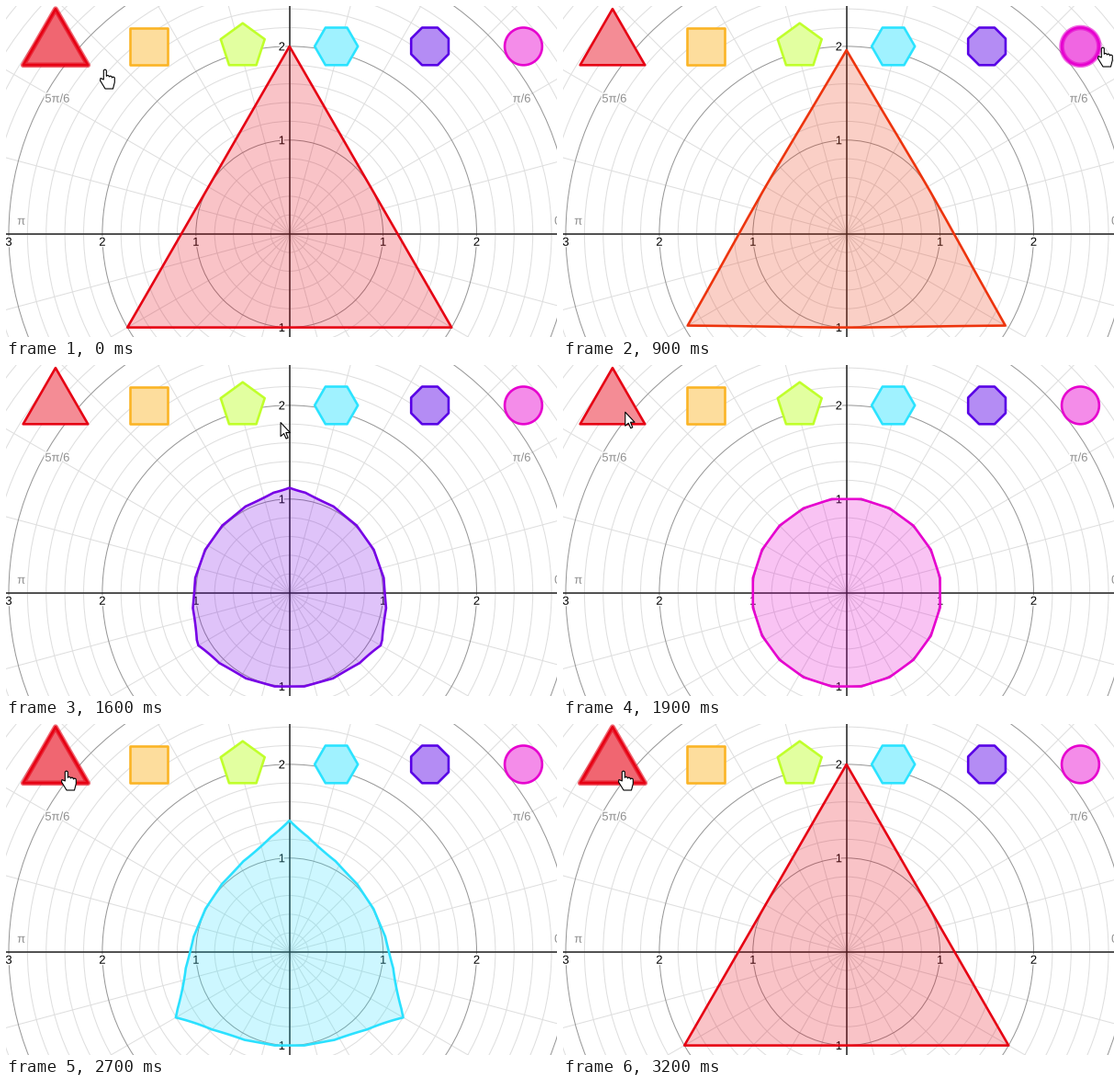
Animation, 600 px wide and 360 px high, one loop 3.3 s. Source, as a matplotlib script:

```python
from colorsys import hsv_to_rgb

import numpy as np
import matplotlib.pyplot as plt
from matplotlib.animation import FuncAnimation
from matplotlib.patches import Circle, Polygon
from matplotlib.patheffects import withStroke

W, H, DPI = 600, 360, 100
FRAMES, STEP = 33, 100
CX, CY, UNIT = 308.7, 247.7, 101.9
PX = 72 / DPI
THETA = np.radians(np.arange(360))

# Number of sides and hue of each button
ICONS = [(3, -5), (4, 40), (5, 78), (6, 188), (8, 263), (60, 306)]

# Pointer stops: time in ms, x, y
STOPS = [(0, 107, 69), (600, 587, 45), (900, 587, 45),
         (1230, 577, 43), (1930, 65, 51), (3300, 65, 51)]


def vivid(hue):
    """Deep reds and violets, softer and brighter greens between them."""
    k = np.clip(1.6 * np.sin(np.pi * (hue + 5) / 250), 0, 1)
    return np.array(hsv_to_rgb(hue / 360 % 1, 1 - .17 * k, .9 + .1 * k))


def tint(rgb, amount):
    return 1 - amount * (1 - rgb)


def smooth(x):
    return x * x * (3 - 2 * x)


def radius(n):
    """Polar radius of a flat-bottomed n-gon with inradius 1."""
    half = np.pi / n
    return 1 / np.cos((THETA + np.pi / 2 + half) % (2 * half) - half)


def polar(r, angle, cx=CX, cy=CY):
    return np.column_stack([cx + r * np.cos(angle), cy - r * np.sin(angle)])


def corners(n, cx, cy, inradius):
    angle = -np.pi / 2 + np.pi / n * (2 * np.arange(n) + 1)
    return polar(inradius / np.cos(np.pi / n), angle, cx, cy)


def hand_points():
    points = []
    for k, top in enumerate((0, 6.3, 7, 8)):
        x = 3 * k + .8
        points += [(x - 1.5, top + 1), (x, top), (x + 1.5, top + 1)]
    palm = [(11.3, 14), (9.5, 21), (1, 21), (-4.5, 12), (-4, 9.5), (-.7, 11)]
    return np.array(points + palm)


HAND = hand_points()
ARROW = np.array([(0, 0), (0, 15), (3.5, 12), (6, 17.5), (8, 16.6),
                  (5.8, 11), (10.3, 11)])

fig = plt.figure(figsize=(W / DPI, H / DPI), dpi=DPI, facecolor="white")
ax = fig.add_axes([0, 0, 1, 1])
ax.set_xlim(0, W)
ax.set_ylim(H, 0)
ax.axis("off")


def add_polygon(points, z, width=2.6):
    return ax.add_patch(Polygon(points, closed=True, lw=width * PX,
                                joinstyle="round", zorder=z))


def label(x, y, text, color="black", ha="center"):
    ax.text(x, y, text, family="Liberation Sans", size=13 * PX, color=color,
            ha=ha, va="center_baseline", zorder=3,
            path_effects=[withStroke(linewidth=3 * PX, foreground="white")])


def draw_grid():
    for k in range(1, 21):
        major = k % 5 == 0
        ax.add_patch(Circle((CX, CY), k * UNIT / 5, fill=False, lw=PX,
                            ec="#969696" if major else "#dedede",
                            zorder=1.5 if major else 1))
    for a in np.arange(0, np.pi, np.pi / 12):
        ax.plot(*polar(np.array([-450, 450]), a).T,
                color="#dedede", lw=PX, zorder=1)
    ax.plot([0, W], [CY, CY], color="#202020", lw=1.5 * PX, zorder=2)
    ax.plot([CX, CX], [0, H], color="#202020", lw=1.5 * PX, zorder=2)


def draw_labels():
    for k in (-3, -2, -1, 1, 2):
        label(CX + k * UNIT, CY + 8.5, str(abs(k)))
    for k in (2, 1, -1):
        label(304, CY - k * UNIT, str(abs(k)), ha="right")
    for degrees, text in ((0, "0"), (30, "π/6"), (150, "5π/6"), (180, "π")):
        x, y = polar(292, np.radians([degrees]))[0]
        lift = 14.5 if degrees % 180 == 0 else 1.5
        label(x, y - lift, text, "#909090")


draw_grid()
draw_labels()

R_TRI, R_ROUND = radius(3), radius(20)
shape = add_polygon(polar(UNIT * R_TRI, THETA), 4)

colors = [vivid(hue) for _, hue in ICONS]
centers = np.array([(CX + (k - 2.5) * UNIT, CY - 2 * UNIT)
                    for k in range(len(ICONS))])
icons, glows = [], []
for (n, _), (x, y), rgb in zip(ICONS, centers, colors):
    points = corners(n, x, y, UNIT / 5)
    icon, glow = add_polygon(points, 5), add_polygon(points, 6, 5.6)
    icon.set_edgecolor(rgb)
    glow.set(facecolor="none", edgecolor=(*rgb, .6))
    icons.append(icon)
    glows.append(glow)

pointer = add_polygon(ARROW, 9, 1.1)
pointer.set(facecolor="white", edgecolor="black")


def pointer_at(t):
    t %= FRAMES * STEP
    for (t0, x0, y0), (t1, x1, y1) in zip(STOPS, STOPS[1:]):
        if t < t1:
            break
    u = smooth((t - t0) / (t1 - t0))
    sag = .03 * abs(x1 - x0) * np.sin(np.pi * u)
    return np.array([x0 + (x1 - x0) * u, y0 + (y1 - y0) * u + sag])


def morph_at(i):
    """0 is the triangle, 1 the round shape; both ways run at equal speed."""
    there = np.clip(.04 + .12 * (i - 9), 0, 1)
    back = np.clip(.04 + .12 * (i - 24), 0, 1) if i > 24 else 0
    return there - back


def update(i):
    s = morph_at(i)
    rgb = vivid(-5 + 311 * s ** .93)
    shape.set_xy(polar(UNIT * ((1 - s) * R_TRI + s * R_ROUND), THETA))
    shape.set(facecolor=(*rgb, .235), edgecolor=rgb)

    # Hover reacts one step behind the pointer
    hover = np.hypot(*(centers - pointer_at((i - 1) * STEP)).T) < 27
    for icon, glow, color, on in zip(icons, glows, colors, hover):
        icon.set_facecolor(tint(color, .6 if on else .45))
        glow.set_visible(on)

    pointer.set_xy(pointer_at(i * STEP) + (HAND if hover.any() else ARROW))
    return [shape, pointer, *icons, *glows]


anim = FuncAnimation(fig, update, frames=FRAMES, interval=STEP,
                     init_func=lambda: update(0), repeat=True,
                     repeat_delay=0, blit=False)
plt.show()
```
